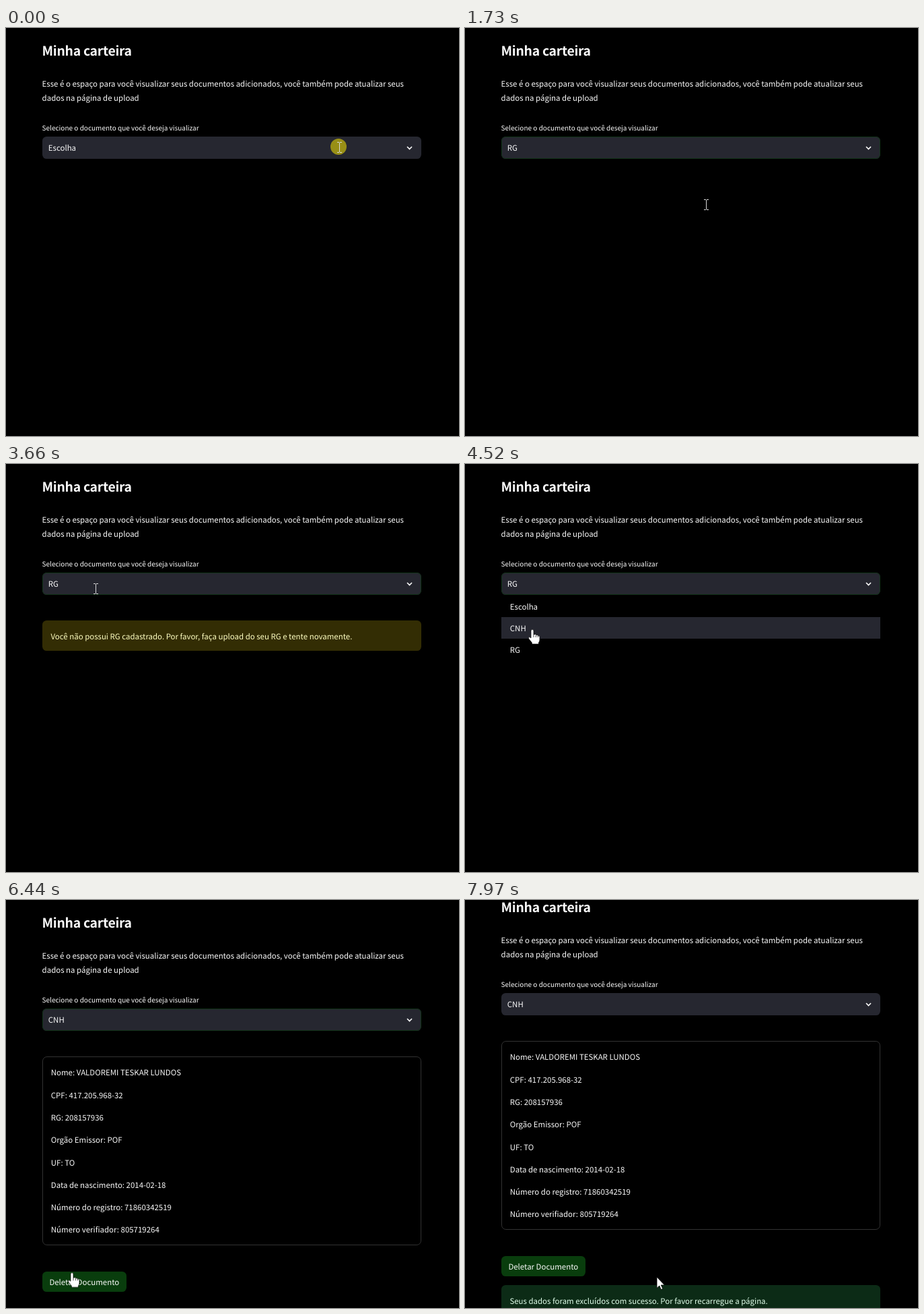
Write an HTML page that moves like this. It is 673 by 605 pixels and loops after 8 s.

```html
<!DOCTYPE html>
<html lang="pt-BR">
<head>
<meta charset="utf-8">
<title>Minha carteira</title>
<style>
  html, body { margin: 0; width: 100%; height: 100%; overflow: hidden; background: #000; }
  svg { display: block; width: 673px; height: 605px; }
  text {
    font: 400 11.46px "Noto Sans CJK JP", "Noto Sans CJK SC", "Noto Sans CJK", "Open Sans", sans-serif;
    fill: #fafafa;
    text-rendering: geometricPrecision;
    white-space: pre;
  }
  .title { font-size: 19.4px; font-weight: 700; letter-spacing: -.3px; }
  .label { font-size: 10.03px; }
  .panel { fill: #262730; }

  /* One 8 s clock: 1% = 80 ms. Hard changes unless stated otherwise. */
  .a { animation: 8s step-end infinite; }
  .page { animation-name: scroll; }
  .focus { animation-name: focus; }
  .none { animation-name: none-picked; }
  .rg { animation-name: rg-picked; }
  .cnh { animation-name: cnh-picked; }
  .warning { animation-name: warning; }
  .card { animation-name: card; }
  .success { animation-name: success; }
  .bar { animation-name: bar; }
  .menu { animation-name: menu; animation-timing-function: linear; }
  .pointer { animation-name: move; animation-timing-function: linear; }
  .click { animation-name: click; }
  .beam { animation-name: beam; }
  .hand { animation-name: hand; }
  .arrow { animation-name: arrow; }

  @keyframes scroll {
    0% { transform: none; }
    98.75% { transform: translateY(-12px); }
    99.6%, 100% { transform: translateY(-23px); }
  }
  @keyframes focus {
    0%, 82%, 100% { visibility: hidden; }
    2% { visibility: visible; }
  }
  @keyframes none-picked {
    0% { visibility: visible; }
    20%, 100% { visibility: hidden; }
  }
  @keyframes rg-picked {
    0%, 63.9%, 100% { visibility: hidden; }
    20% { visibility: visible; }
  }
  @keyframes cnh-picked {
    0% { visibility: hidden; }
    63.9%, 100% { visibility: visible; }
  }
  @keyframes warning {
    0%, 65.6%, 100% { visibility: hidden; }
    25% { visibility: visible; }
  }
  @keyframes card {
    0% { visibility: hidden; }
    65.6%, 100% { visibility: visible; }
  }
  @keyframes success {
    0% { visibility: hidden; }
    86.25%, 100% { visibility: visible; }
  }
  @keyframes menu {
    0%, 1.2%, 20%, 47.4%, 64%, 100% { opacity: 0; }
    2.9%, 19.1%, 49.1%, 63% { opacity: 1; }
  }
  @keyframes bar {
    0%, 53.7% { transform: none; }
    11.5%, 55.5%, 100% { transform: translateY(32px); }
    14.3% { transform: translateY(64px); }
  }
  @keyframes move {
    0%, 7.5% { transform: translate(495px, 177px); }
    14.125% { transform: translate(412px, 260px); }
    16.625%, 31.7% { transform: translate(358px, 262px); }
    34.125% { transform: translate(50px, 278px); }
    37.5% { transform: translate(525px, 278px); }
    41.5%, 45% { transform: translate(145px, 189px); }
    45.7%, 53.125% { transform: translate(133px, 185px); }
    56.4%, 70.5% { transform: translate(100px, 245px); }
    73% { transform: translate(86px, 178px); }
    80.4% { transform: translate(98px, 551px); }
    81.375% { transform: translate(98px, 562px); }
    82.125%, 83.875% { transform: translate(98px, 567px); }
    88%, 91.375% { transform: translate(2px, 573px); }
    93.25% { transform: translate(130px, 516px); }
    95.5%, 100% { transform: translate(285px, 559px); }
  }
  @keyframes click {
    0%, 18.25%, 46.6%, 62.25%, 81.375% { visibility: visible; }
    2.5%, 20%, 48.25%, 63.9%, 83.875%, 100% { visibility: hidden; }
  }
  @keyframes beam {
    0%, 20.75%, 41%, 72.5% { visibility: visible; }
    8.9%, 32.5%, 53.6%, 73.8%, 100% { visibility: hidden; }
  }
  @keyframes hand {
    0%, 20.75%, 64.4%, 84.5%, 100% { visibility: hidden; }
    8.9%, 53.6%, 80.2% { visibility: visible; }
  }
  @keyframes arrow {
    0%, 41%, 72.5%, 80.2% { visibility: hidden; }
    32.5%, 64.4%, 73.8%, 84.5%, 100% { visibility: visible; }
  }
</style>
</head>
<body>
<svg viewBox="0 0 673 605">
  <g class="a page">
    <text class="title" x="53.6" y="41">Minha carteira</text>
    <text x="53.6" y="87">Esse é o espaço para você visualizar seus documentos adicionados, você também pode atualizar seus</text>
    <text x="53.6" y="108">dados na página de upload</text>
    <text class="label" x="53.6" y="152">Selecione o documento que você deseja visualizar</text>

    <rect class="panel" x="54" y="161" width="563" height="33" rx="6.4"/>
    <rect class="a focus" x="54.5" y="161.5" width="562" height="32" rx="6" fill="none" stroke="#123419"/>
    <text class="a none" x="62.8" y="182">Escolha</text>
    <text class="a rg" x="62.8" y="182">RG</text>
    <text class="a cnh" x="62.8" y="182">CNH</text>
    <path d="M596 176l3.5 3.5 3.5-3.5" fill="none" stroke="#fafafa" stroke-width="1.6"/>

    <g class="a warning">
      <rect x="54" y="232" width="563" height="45" rx="6.4" fill="#332d04"/>
      <text x="66.4" y="260" style="fill:#ffffc2">Você não possui RG cadastrado. Por favor, faça upload do seu RG e tente novamente.</text>
    </g>

    <g class="a card">
      <rect x="54.5" y="232.5" width="562" height="279" rx="6.4" fill="none" stroke="#323232"/>
      <text>
        <tspan x="66.8" y="260">Nome: VALDOREMI TESKAR LUNDOS</tspan>
        <tspan x="66.8" y="294">CPF: 417.205.968-32</tspan>
        <tspan x="66.8" y="327">RG: 208157936</tspan>
        <tspan x="66.8" y="360">Orgão Emissor: POF</tspan>
        <tspan x="66.8" y="394">UF: TO</tspan>
        <tspan x="66.8" y="427">Data de nascimento: 2014-02-18</tspan>
        <tspan x="66.8" y="460">Número do registro: 71860342519</tspan>
        <tspan x="66.8" y="493">Número verifiador: 805719264</tspan>
      </text>
      <rect x="54" y="551" width="125" height="30" rx="6.4" fill="#093d0d"/>
      <text x="64.4" y="571">Deletar Documento</text>
    </g>

    <g class="a success">
      <rect x="54" y="594" width="563" height="45" rx="6.4" fill="#0c2b16"/>
      <text x="66.4" y="622" style="fill:#dffde9">Seus dados foram excluídos com sucesso. Por favor recarregue a página.</text>
    </g>

    <g class="a menu">
      <rect x="54" y="195" width="563" height="102"/>
      <rect class="a bar panel" x="54" y="195" width="563" height="32"/>
      <text x="66.8" y="216">Escolha</text>
      <text x="66.8" y="248">CNH</text>
      <text x="66.8" y="280">RG</text>
    </g>
  </g>

  <g class="a pointer">
    <circle class="a click" cx="-1" cy="-1" r="12" fill="#ffec00" fill-opacity=".53"/>
    <path class="a beam" d="M-3-7.5H0M1-7.5H4M.5-7V7M-3 7.5H0M1 7.5H4" fill="none" stroke="#d8d8d8"/>
    <g class="a hand">
      <path d="M-2 1.6Q0-1 2 1.6V8Q5 6.5 5.6 8.6 8 7.6 8.4 9.8 11 9 11 11.6V16Q11 18 9.4 20V22H-.6V20L-5.4 14Q-6.4 11.6-4 11.6L-2 13Z" fill="#fff" stroke="#000" stroke-width=".7"/>
      <path d="M2 8V12M5.4 9V12M8.3 10V12" stroke="#000" stroke-width=".7"/>
    </g>
    <path class="a arrow" d="M0 0V16.5L3.8 13 6.3 18.6 8.8 17.5 6.3 12H11.4Z" fill="#fff" stroke="#000" stroke-width=".8"/>
  </g>
</svg>
</body>
</html>
```
